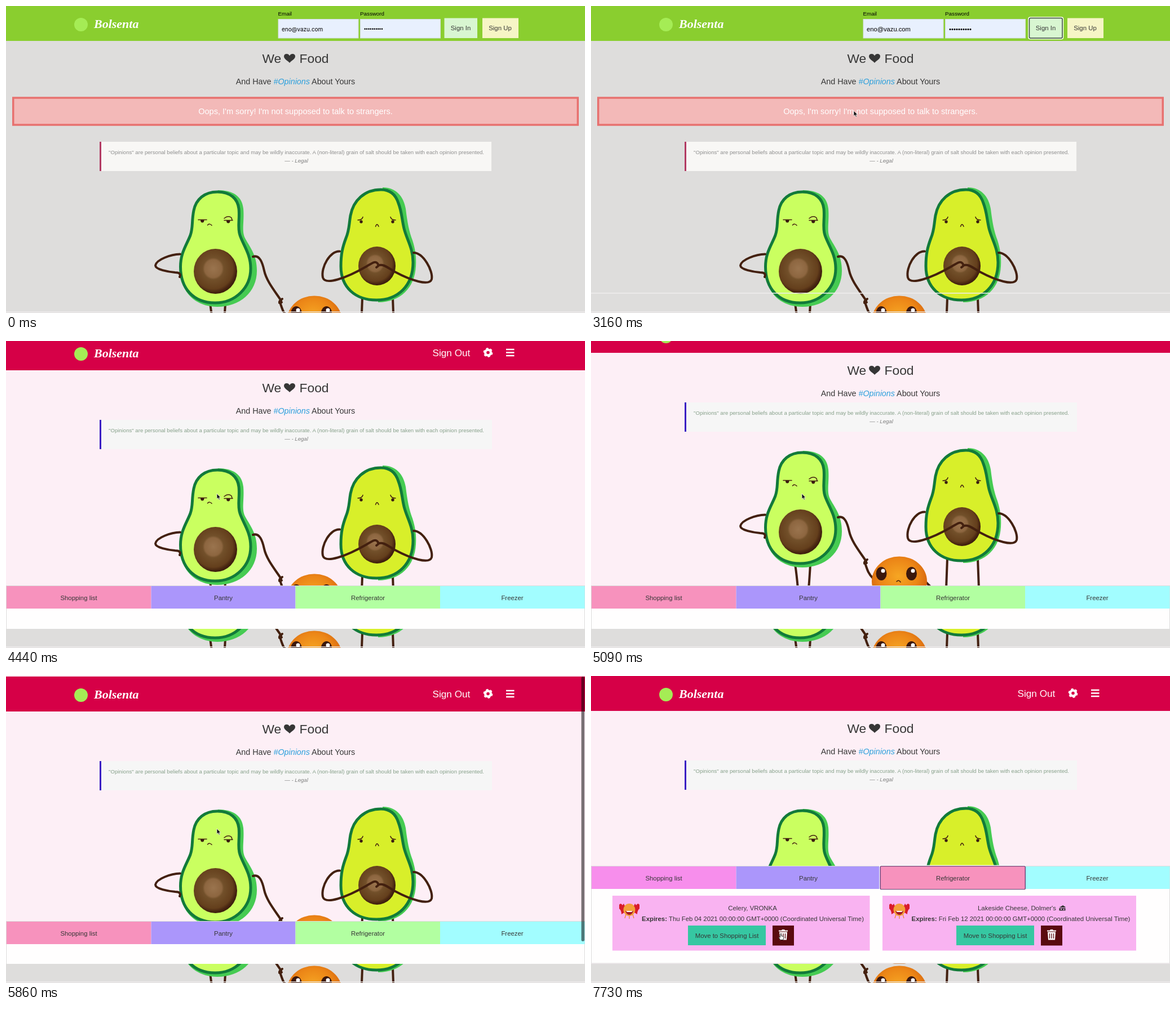
An HTML page that plays this animation: 1027 by 545 pixels, repeating every 8000 ms.

```html
<!DOCTYPE html>
<html lang="en">
<head>
<meta charset="utf-8">
<title>Bolsenta</title>
<style>
html, body { margin: 0; width: 100%; height: 100%; overflow: hidden; background: #dedddc; }
svg { display: block; }
#stage { width: 100vw; height: 100vh; font-family: "Liberation Sans", Arial, sans-serif; }
.mid { text-anchor: middle; }
.ui { font-size: 11.4px; fill: #363636; }
.line { fill: none; stroke: #43200f; stroke-width: 4; stroke-linecap: round; stroke-linejoin: round; }
.thin { stroke-width: 1.5; }
.rim { stroke: #127a3a; stroke-width: 5; }
.brand { font: italic bold 22px "Liberation Serif", "Times New Roman", serif; fill: #fff; }

.anim { animation: 8s step-end infinite; }
#edge { animation-name: edge; }
#before { animation-name: before; }
#after { animation-name: after; }
#app { animation-name: app; }
#cards { animation-name: cards; }
#focus { animation-name: focus; }
#tab1 { animation-name: tab1; }
#tab3 { animation-name: tab3; }
#foot { animation-name: foot; }
#arrow { animation-name: arrow; }
#hand { animation-name: hand; }
#page { animation-name: scroll; }
#bar { animation-name: bar; }
#pointer { animation-name: pointer; }

@keyframes edge { 0% { opacity: 0 } 3.875%, 100% { opacity: 1 } }
@keyframes before { 0% { opacity: 1 } 25.125%, 100% { opacity: 0 } }
@keyframes after { 0% { opacity: 0 } 25.125%, 100% { opacity: 1 } }
@keyframes app { 0% { opacity: 0 } 41.25%, 100% { opacity: 1 } }
@keyframes cards { 0% { opacity: 0 } 83%, 100% { opacity: 1 } }
@keyframes focus { 0% { opacity: 0 } 90.625%, 100% { opacity: 1 } }
@keyframes tab1 { 0% { fill: #f792bd } 83%, 100% { fill: #f78eec } }
@keyframes tab3 { 0% { fill: #b2ffa1 } 81.875% { fill: #f8a99e } 90.625%, 100% { fill: #f792bd } }
@keyframes foot {
  0% { transform: translateY(0) }
  73.25% { transform: translateY(1px) }
  74.75% { transform: translateY(0) }
  83%, 100% { transform: translateY(-97px) }
}
@keyframes arrow { 0% { opacity: 0 } 3.875% { opacity: 1 } 81.875%, 100% { opacity: 0 } }
@keyframes hand { 0% { opacity: 0 } 81.875%, 100% { opacity: 1 } }
@keyframes scroll {
  0% { transform: translateY(0) }
  54.5% { transform: translateY(0); animation-timing-function: steps(2, jump-both) }
  56.625% { transform: translateY(-30px) }
  58.75% { transform: translateY(-30px); animation-timing-function: steps(4, jump-both) }
  63.625% { transform: translateY(-41px) }
  64.625% { transform: translateY(-41px); animation-timing-function: steps(3, jump-both) }
  68.5% { transform: translateY(-14px) }
  69.625% { transform: translateY(-14px); animation-timing-function: steps(1, jump-both) }
  70.75% { transform: translateY(-2px) }
  73.25% { transform: translateY(1px) }
  74.75%, 100% { transform: translateY(0) }
}
@keyframes bar {
  0% { opacity: 0 }
  69.625% { opacity: 1 }
  74.75% { opacity: .5 }
  75.625%, 100% { opacity: 0 }
}
@keyframes pointer {
  0% { transform: translate(829px, 45px) }
  9.75% { transform: translate(829px, 45px); animation-timing-function: steps(2, jump-both) }
  11.375% { transform: translate(798px, 34px) }
  34.75% { transform: translate(798px, 34px); animation-timing-function: steps(5, jump-both) }
  39.5% { transform: translate(466px, 186px) }
  43.125% { transform: translate(466px, 186px); animation-timing-function: steps(7, jump-both) }
  51.5% { transform: translate(374px, 271px) }
  78.75% { transform: translate(374px, 271px); animation-timing-function: steps(3, jump-both) }
  81.875% { transform: translate(633px, 460px) }
  90.625% { transform: translate(633px, 460px); animation-timing-function: steps(5, jump-both) }
  96.625%, 100% { transform: translate(337px, 457px) }
}
</style>
</head>
<body>
<svg id="stage" viewBox="0 0 1027 545" xmlns="http://www.w3.org/2000/svg">
<defs>
  <radialGradient id="pit" cx=".45" cy=".44" r=".58">
    <stop offset="0" stop-color="#9a744e"/>
    <stop offset=".34" stop-color="#8d6640"/>
    <stop offset=".42" stop-color="#72502a"/>
    <stop offset=".78" stop-color="#643f1c"/>
    <stop offset=".9" stop-color="#472511"/>
    <stop offset="1" stop-color="#3a1b0c"/>
  </radialGradient>
  <radialGradient id="peel" cx=".48" cy=".4" r=".58">
    <stop offset="0" stop-color="#f6a623"/>
    <stop offset=".6" stop-color="#ec8617"/>
    <stop offset="1" stop-color="#d2600c"/>
  </radialGradient>

  <g id="logo">
    <circle cx="133" cy="33" r="12" fill="#a5ec55"/>
    <text class="brand" x="156" y="39">Bolsenta</text>
  </g>

  <g id="title" fill="#363636">
    <g font-size="22.8">
      <text x="454.5" y="100.700">We</text>
      <text x="572.5" y="100.700" text-anchor="end">Food</text>
    </g>
    <path d="M503 101C500 97 493 94.500 493 89.500C493 84 501 83.500 503 88.500C505 83.500 513 84 513 89.500C513 94.500 506 97 503 101Z"/>
    <text class="mid" x="513.5" y="139" font-size="14.3">And Have <tspan font-style="italic" fill="#2a9fdc">#Opinions</tspan> About Yours</text>
  </g>

  <g id="quote" class="mid" font-size="9.6">
    <text x="515" y="263.300" fill="currentColor">"Opinions" are personal beliefs about a particular topic and may be wildly inaccurate. A (non-literal) grain of salt should be taken with each opinion presented.</text>
    <text x="515" y="277.700" fill="#7f7f7f" font-style="italic">— - Legal</text>
  </g>

  <g id="fruit">
    <path class="line" d="M362 528Q365 548 367 572M389 528Q388 548 386 572M632 518L630 572M686 518L688 572"/>

    <path fill="#46cb52" d="M376 327C403 327 419 338 421 360C423 385 417 400 425 414C434 430 445 443 445 470C445 508 415 534 375 534C345 534 322 518 314 495Z"/>
    <path class="rim" fill="#caff60" d="M375 330C352 330 337 343 333 363C329 383 332 393 327 407C320 425 309.500 438 309.500 463C309.500 501 332 527 371 527C407 527 434 500 434 466C434 440 421 425 415 407C410 393 415 378 413 360C411 342 398 330 375 330Z"/>
    <ellipse cx="371.500" cy="471" rx="38.500" ry="40" fill="url(#pit)"/>
    <path class="line" d="M309 440.500C292 441 267 450 265 460.500C265 468 288 472 300 473C309 473 310 477 308 481M438 445C450 441 455 456 458 470C462 488 476 505 488 523M490 520Q484 523 485 527L489 526"/>
    <path class="line thin" d="M341 379.500H356M387 380.500H402M387 377Q394 371 400 376L401 380M357.500 389Q361 385 365 389.500"/>
    <path fill="#3a1c10" d="M345 380h6.500a3.250 4.500 0 0 1-6.500 0zM391 381h6.500a3.250 4.500 0 0 1-6.500 0z"/>

    <path fill="#46cb52" d="M668 322C691 322 705 337 709 360C712 385 715 400 721 416C726 432 728 445 727 462C725 500 700 526 660 526Z"/>
    <path class="rim" fill="#d8ef2a" d="M665 326C636 326 616 345 611 372C608 390 609 398 603 412C597 428 594 440 594 462C594 500 620 522 657 522C695 522 722 497 722 455C722 430 711 415 706 395C702 378 702 365 696 350C691 334 680 326 665 326Z"/>
    <ellipse cx="658" cy="461.500" rx="33" ry="34.500" fill="url(#pit)"/>
    <path class="line" d="M592 435.500C575 434 558 464 562 482C566 496 602 484 640 462C650 456 655 452 659 457C662 461 660 462 657 464M723 438C740 438 758 470 755 485C751 498 718 487 690 472C675 463 668 457 660 461"/>
    <path class="line thin" d="M624 380Q632 380 633 374.500M682 374.500Q683 380 691 380M655.500 391.500Q658 384 661 391.500"/>
    <g fill="#3a1c10"><circle cx="630" cy="383" r="2.700"/><circle cx="686" cy="383" r="2.700"/></g>

    <path class="line" d="M487 529C490 538 492 545 500 553M594 560L604 570"/>
    <ellipse cx="547" cy="558.500" rx="49" ry="44" fill="url(#peel)"/>
    <g fill="#3b180d"><ellipse cx="515" cy="545" rx="9.500" ry="12"/><ellipse cx="568.500" cy="545" rx="9.500" ry="12"/></g>
    <g fill="#fff"><circle cx="518" cy="540" r="3.500"/><circle cx="571" cy="540" r="3.500"/></g>
    <path class="line thin" d="M542 559Q546 555 549 560"/>
  </g>

  <g id="bin">
    <path fill="#fff" d="M-8 -8.500H-3L-2 -10H2L3 -8.500H8V-6.500H-8ZM-7 -5.500H7L6 8.500H-6Z"/>
    <path stroke="#5a0a0f" stroke-width="1.300" d="M-3.500 -3V6M0 -3V6M3.500 -3V6"/>
  </g>

  <g id="crab">
    <path fill="#d81c2c" d="M-18 -10Q-15 -14 -12 -9L-10 -12Q-5 -4 -9 4L-14 7Q-14 0 -18 -3ZM18 -10Q15 -14 12 -9L10 -12Q5 -4 9 4L14 7Q14 0 18 -3Z"/>
    <path stroke="#e88a2a" stroke-width="1.200" d="M-6 7L-8 14M6 7L8 14M0 8V15"/>
    <ellipse cy="-1" rx="10.500" ry="11" fill="#f3a03a"/>
    <path fill="#a51824" d="M-7 1H7Q5 8 0 8T-7 1Z"/>
    <path fill="#fff" d="M-6 1H6L4 3H-4Z"/>
  </g>

  <g id="tools">
    <rect x="172" y="443" width="138" height="35" fill="#36c7a2"/>
    <text class="ui mid" x="241" y="464.500">Move to Shopping List</text>
    <rect x="322" y="443" width="38" height="35.500" fill="#5a0a0f"/>
    <use href="#bin" x="341" y="460"/>
  </g>
</defs>

<!-- signed-out page -->
<rect width="1027" height="545" fill="#dedddc"/>
<rect width="1027" height="62" fill="#8ace2f"/>
<use href="#logo"/>
<g font-size="9.8"><text x="482.500" y="16.500">Email</text><text x="628" y="16.500">Password</text></g>
<g fill="#e8f0fe" stroke="#d3dde0">
  <rect x="483" y="23.500" width="142" height="33.500"/>
  <rect x="628.500" y="23.500" width="142" height="33.500"/>
</g>
<g id="before" class="anim">
  <text x="489" y="44.500" font-size="10" font-family="Inter, sans-serif">eno@vazu.com</text>
  <text x="635" y="44" font-size="9.600">••••••••••</text>
</g>
<rect x="777.500" y="21.500" width="58.500" height="35.500" fill="#d8f6d1"/>
<rect x="845" y="21.500" width="64" height="35.500" fill="#f6f5c5"/>
<g id="after" class="anim">
  <text x="489" y="44.500" font-size="11.200">eno@vazu.com</text>
  <text x="635" y="44.500" font-size="11.400">••••••••••</text>
  <g fill="none">
    <rect x="776" y="20" width="61.500" height="38.500" rx="3" stroke="#fff" stroke-width="1.500"/>
    <rect x="777.500" y="21.500" width="58.500" height="35.500" rx="2" stroke="#3d4a48" stroke-width="1.500"/>
  </g>
</g>
<g class="ui mid"><text x="806.500" y="43">Sign In</text><text x="876.500" y="43">Sign Up</text></g>
<use href="#title"/>
<rect x="12.750" y="163" width="1001.500" height="48" fill="#f3b9b8" stroke="#e7716f" stroke-width="3.500"/>
<text class="mid" x="513.500" y="192" font-size="14.570" fill="#fff">Oops, I'm sorry! I'm not supposed to talk to strangers.</text>
<rect x="166" y="241" width="695" height="52" fill="#f8f7f5"/>
<rect x="166" y="241" width="3" height="52" fill="#b23a63"/>
<use href="#quote" color="#8f8f8f"/>
<use href="#fruit"/>
<rect y="542.500" width="1027" height="1.500" fill="#efeeee"/>
<rect id="edge" class="anim" y="509" width="1027" height="1.500" fill="#efeeee"/>

<!-- signed-in page -->
<g id="app" class="anim">
<svg width="1027" height="510.500" overflow="hidden">
  <rect width="1027" height="511" fill="#fdeff6"/>
  <g id="page" class="anim">
    <rect width="1027" height="62" fill="#d60047"/>
    <use href="#logo"/>
    <text x="756.500" y="36.500" font-size="17.200" fill="#fff">Sign Out</text>
    <g fill="none" stroke="#fff">
      <circle cx="855" cy="30.500" r="4.900" stroke-width="4.200"/>
      <circle cx="855" cy="30.500" r="7.300" stroke-width="2.200" stroke-dasharray="4 3.644"/>
      <path d="M887 25H901.500M887 30.500H901.500M887 36H901.500" stroke-width="2.400"/>
    </g>
    <use href="#title"/>
    <rect x="166" y="150" width="696" height="52" fill="#f6f6f6"/>
    <rect x="166" y="150" width="3" height="52" fill="#3a1cc4"/>
    <use href="#quote" y="-91" color="#87a08a"/>
    <use href="#fruit" y="-91"/>
  </g>
  <g id="foot" class="anim">
    <rect x=".5" y="434.500" width="1026" height="172.500" fill="#fffefe" stroke="#dcdcdc"/>
    <rect id="tab1" class="anim" x="1" y="435" width="256.500" height="40" fill="#f792bd"/>
    <rect x="257.500" y="435" width="256" height="40" fill="#ab96fb"/>
    <rect id="tab3" class="anim" x="513.500" y="435" width="256.500" height="40" fill="#b2ffa1"/>
    <rect x="770" y="435" width="256.500" height="40" fill="#a2fdff"/>
    <g id="focus" class="anim" fill="none">
      <path d="M512 475.500V433.500H771" stroke="#fff" stroke-width="1.500"/>
      <rect x="513.250" y="434.750" width="257" height="41" rx="1.500" stroke="#5a2a63" stroke-width="1.200"/>
    </g>
    <g class="ui mid">
      <text x="129" y="459.500">Shopping list</text>
      <text x="385.500" y="459.500">Pantry</text>
      <text x="642" y="459.500">Refrigerator</text>
      <text x="898" y="459.500">Freezer</text>
    </g>
  </g>
  <g id="cards" class="anim">
    <g fill="#f9b3f1">
      <rect x="38" y="390" width="456.500" height="97.500"/>
      <rect x="517" y="390" width="450" height="97.500"/>
    </g>
    <use href="#crab" x="68" y="416"/>
    <use href="#crab" x="547" y="416"/>
    <use href="#tools"/>
    <use href="#tools" x="476"/>
    <g class="ui mid">
      <text x="286.500" y="416">Celery, VRONKA</text>
      <text x="755.500" y="416">Lakeside Cheese, Dolmer's</text>
      <text x="287" y="434.500"><tspan font-weight="bold">Expires:</tspan> Thu Feb 04 2021 00:00:00 GMT+0000 (Coordinated Universal Time)</text>
      <text x="762.500" y="434.500"><tspan font-weight="bold">Expires:</tspan> Fri Feb 12 2021 00:00:00 GMT+0000 (Coordinated Universal Time)</text>
    </g>
    <path fill="#363636" d="M830.500 411L837 407L841.500 410V411ZM830.500 412H841.500V416.500H830.500Z"/>
    <path fill="#f9b3f1" d="M833 413h2v2h-2zM837.500 413.500h2v2h-2z"/>
  </g>
  <rect id="bar" class="anim" x="1020.500" y="1" width="5.500" height="470" rx="2.700" fill-opacity=".53"/>
</svg>
</g>

<g id="pointer" class="anim">
  <path id="arrow" class="anim" d="M0 0V9.500L2.200 7.500L3.800 11L5.400 10.300L3.900 7H6.800Z" fill="#111" stroke="#fff" stroke-width=".7"/>
  <path id="hand" class="anim" d="M-1.500 7V1Q-.5 -.5 .5 1V4.500L4 5.200Q5 5.800 4.700 7.500L3.800 11.500H-1L-4 7.300Q-3.500 5.800 -1.500 7Z" fill="#fff" stroke="#222" stroke-width=".9"/>
</g>
</svg>
</body>
</html>
```
